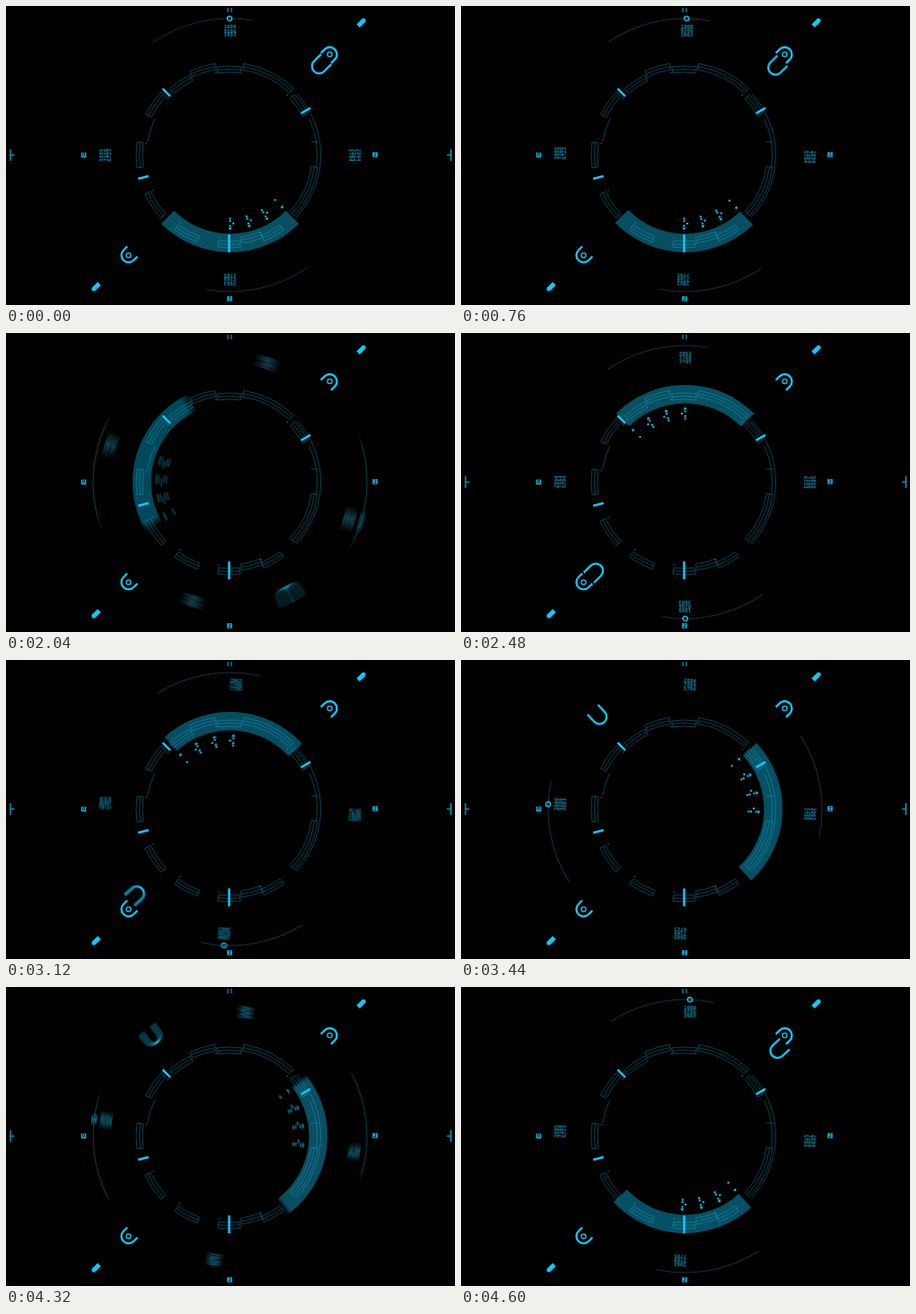
Animation, 500 px wide and 334 px high, one loop 4760 ms. Source, as an HTML page with a canvas:

```html
<!DOCTYPE html>
<html lang="en">
<head>
<meta charset="utf-8">
<style>
  html, body { margin: 0; width: 100%; height: 100%; overflow: hidden; background: #000; }
  canvas { display: block; }
</style>
</head>
<body>
<canvas id="stage" width="500" height="334"></canvas>
<script>
const ctx = document.getElementById('stage').getContext('2d');
const LOOP = 4760, STEP = 40, LAST = 4600, QUARTER = 1160;
const DIAL_X = 248.5, ROTOR_X = 249.5, CY = 166.5;
const rad = deg => deg * Math.PI / 180;
const cyan = alpha => `rgba(18,200,246,${alpha})`;

// Angular extent of the dial sections on the outer and the inner level
const outerSections = [[-154, -137], [-115, -99], [-81, -46], [54, 68], [83, 97], [110, 126], [137, 155], [172, 188]];
const innerSections = [[-132, -116], [-98, -82], [-43, -28], [8, 43], [68, 82]];

let seed = 7;
const random = () => (seed = seed * 16807 % 2147483647) / 2147483647;
const digits = () => String(Math.floor(1000 + random() * 9000));
const readouts = Array.from({ length: 4 }, () => [digits(), digits(), digits()]);

function path(width, color, build) {
  ctx.beginPath();
  build();
  ctx.lineWidth = width;
  ctx.strokeStyle = color;
  ctx.stroke();
}

function arc(r, from, to) {
  ctx.moveTo(r * Math.cos(rad(from)), r * Math.sin(rad(from)));
  ctx.arc(0, 0, r, rad(from), rad(to));
}

function sector(inner, outer, from, to) {
  ctx.moveTo(inner * Math.cos(rad(from)), inner * Math.sin(rad(from)));
  ctx.arc(0, 0, outer, rad(from), rad(to));
  ctx.arc(0, 0, inner, rad(to), rad(from), true);
  ctx.closePath();
}

function line(x1, y1, x2, y2) {
  ctx.moveTo(x1, y1);
  ctx.lineTo(x2, y2);
}

function at(x, y, deg, draw) {
  ctx.save();
  ctx.translate(x, y);
  ctx.rotate(rad(deg));
  draw();
  ctx.restore();
}

// Half capsule opening towards +y
function hook(leg) {
  path(2.3, cyan(1), () => {
    ctx.moveTo(-8, leg);
    ctx.lineTo(-8, 0);
    ctx.arc(0, 0, 8, Math.PI, 0);
    ctx.lineTo(8, leg);
  });
}

function ring(x, y) {
  path(1.3, cyan(1), () => ctx.arc(x, y, 2.6, 0, 7));
}

// One quarter turn: slow start, fast middle, short overshoot that dies away
function quarterTurn(t) {
  const x = Math.min(1, Math.max(0, (t - 660) / 400));
  const a = x ** 2.5, b = (1 - x) ** 2.5;
  const s = Math.max(0, t - 1045) / 45;
  return 90 * a / (a + 7.15 * b) + 2.6 * s * Math.exp(1 - s);
}

function turn(t) {
  let sum = 0;
  for (let i = 0; i < 4; i++) sum += quarterTurn(t - i * QUARTER);
  return sum;
}

// Arrowhead with a trail of dots
function pointer(dots) {
  ctx.beginPath();
  ctx.moveTo(-2, 81);
  ctx.lineTo(2, 81);
  ctx.lineTo(0, 84);
  ctx.fill();
  for (let j = 0; j < dots; j++) ctx.fillRect(j === 2 ? 2.6 : -1, 70 + 2.7 * j, 2, 2);
}

function drawRotor() {
  ctx.fillStyle = cyan(0.4);
  ctx.beginPath();
  sector(88, 108.5, 45, 135);
  ctx.fill();
  path(1, cyan(0.25), () => {
    for (const flip of [0, 180]) arc(152.5, flip - 124.7, flip - 80.2);
  });
  ring(-0.5, -152.5);

  ctx.fillStyle = cyan(1);
  for (let i = 0; i < 4; i++) at(0, 0, -15 * i, () => pointer(i < 3 ? 4 : 1));
  at(99.2, -99.2, 225, () => hook(11));

  ctx.font = 'bold 5.8px "DejaVu Sans Mono", monospace';
  ctx.fillStyle = cyan(0.65);
  readouts.forEach((rows, i) => at(0, 0, 90 * i, () => {
    rows.forEach((row, j) => ctx.fillText(row, 0, -143 + 4.5 * j));
  }));
}

function drawSections(sections, outer) {
  path(1, cyan(0.33), () => {
    for (const [from, to] of sections) {
      sector(outer - 7, outer, from, to);
      arc(outer - 3.5, from, to);
    }
  });
}

function mark(deg, half) {
  at(0, 0, deg, () => path(2.5, cyan(1), () => line(98.7 - half, 0, 98.7 + half, 0)));
}

function drawDial() {
  drawSections(outerSections, 103.5);
  drawSections(innerSections, 99.5);
  path(1, cyan(0.33), () => {
    arc(102, -42, 43);
    arc(98, -24, 8);
    arc(92, -171, -154);
    line(91, -14.5, 99, -14.5);
  });
  ctx.fillStyle = cyan(0.5);
  for (const [, to] of outerSections) at(0, 0, to, () => ctx.fillRect(92.5, -0.7, 1.4, 1.4));
  for (const deg of [-135, -30.2, 165.3]) mark(deg, 6);
  mark(90, 10);
}

function badge(x, y, digit) {
  ctx.fillStyle = cyan(0.9);
  ctx.fillRect(x - 2.8, y - 2.8, 5.6, 5.6);
  ctx.font = 'bold 6px "DejaVu Sans Mono", monospace';
  ctx.fillStyle = '#001a22';
  ctx.fillText(digit, x, y + 0.4);
}

function pencil() {
  ctx.fillStyle = cyan(1);
  ctx.beginPath();
  ctx.moveTo(-5.5, -2.5);
  ctx.lineTo(4, -2.5);
  ctx.lineTo(6, 0);
  ctx.lineTo(4, 2.5);
  ctx.lineTo(-5.5, 2.5);
  ctx.fill();
}

function drawFixed() {
  for (const [side, deg] of [[1, 0], [-1, 180]]) {
    const x = 248.5 + 112 * side, y = 166.2 - 112.2 * side;
    ring(x, y);
    at(x, y, deg + 45, () => hook(6));
    at(248 + 148 * side, 166.2 - 147.8 * side, deg - 45, pencil);
  }
  path(1.2, cyan(0.75), () => {
    for (const x of [247, 251]) line(x, 2, x, 7);
  });
  badge(86.5, 166.5, '0');
  badge(411, 166, '2');
  badge(249, 327, '2');
}

function drawTicks() {
  path(1.2, cyan(0.9), () => {
    for (const [x, inward] of [[5, 4.5], [495.5, -4.5]]) {
      line(x, 160, x, 173);
      line(x, 166.5, x + inward, 166.5);
    }
  });
}

function render(time) {
  const step = Math.floor(Math.min(time % LOOP, LAST) / STEP);
  const t = step * STEP;
  ctx.fillStyle = '#000';
  ctx.fillRect(0, 0, 500, 334);
  ctx.textAlign = 'center';
  ctx.textBaseline = 'middle';

  // Motion blur: average several poses within the shutter time
  const from = turn(t - 10), sweep = turn(t + 10) - from;
  const samples = Math.abs(sweep) < 0.1 ? 1 : Math.min(24, 4 + Math.ceil(Math.abs(sweep) * 2));
  ctx.globalCompositeOperation = 'lighter';
  ctx.globalAlpha = 1 / samples;
  for (let i = 0; i < samples; i++) at(ROTOR_X, CY, from + sweep * (i + 0.5) / samples, drawRotor);
  ctx.globalAlpha = 1;
  ctx.globalCompositeOperation = 'source-over';

  at(DIAL_X, CY, 0, drawDial);
  drawFixed();
  if (step % 2 === 0) drawTicks();
}

const start = performance.now();
function loop() {
  render(performance.now() - start);
  requestAnimationFrame(loop);
}
loop();
</script>
</body>
</html>
```
